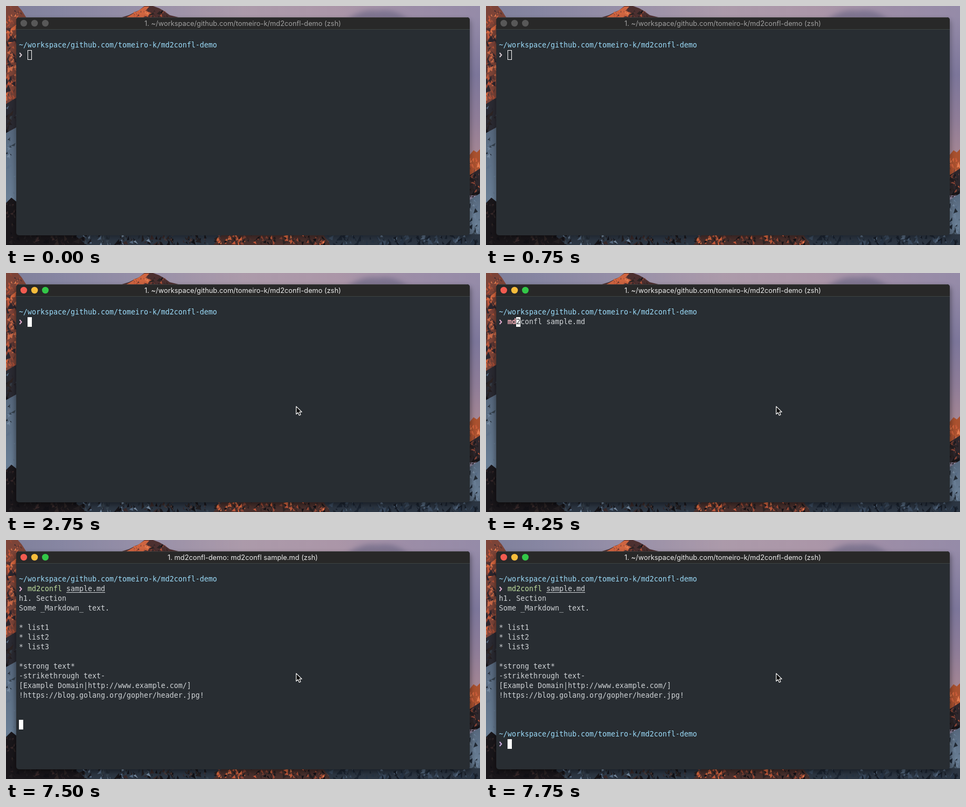
Animation of 880 by 444 pixels, one loop 8 s. Source, as an HTML page:

```html
<!DOCTYPE html>
<html lang="en">
<head>
<meta charset="utf-8">
<title>Terminal demo</title>
<style>
html, body { margin: 0; width: 100%; height: 100%; overflow: hidden; background: #282d32; }
svg { display: block; width: 880px; height: 444px; }
text { white-space: pre; }
#term { font: 13.29px "DejaVu Sans Mono", monospace; }
#title { font: 12.82px Inter, Roboto, sans-serif; text-anchor: middle; }
</style>
</head>
<body>
<svg id="stage" viewBox="0 0 880 444" xmlns="http://www.w3.org/2000/svg">
  <defs>
    <linearGradient id="sky">
      <stop offset="0" stop-color="#7f809b"/>
      <stop offset=".12" stop-color="#8786a2"/>
      <stop offset=".3" stop-color="#9890a8"/>
      <stop offset=".5" stop-color="#ac9aaa"/>
      <stop offset=".7" stop-color="#ab96a8"/>
      <stop offset=".85" stop-color="#9c8da7"/>
      <stop offset="1" stop-color="#958ba8"/>
    </linearGradient>
    <linearGradient id="dusk" x2="0" y2="1">
      <stop offset="0" stop-color="#958ba8"/>
      <stop offset=".4" stop-color="#7c769a"/>
      <stop offset=".7" stop-color="#8f7d98"/>
      <stop offset="1" stop-color="#a98893"/>
    </linearGradient>
    <linearGradient id="snow" x2="0" y2="1">
      <stop offset="0" stop-color="#56677c"/>
      <stop offset=".6" stop-color="#687d94"/>
      <stop offset="1" stop-color="#445263"/>
    </linearGradient>
    <filter id="soft" x="-10%" y="-50%" width="120%" height="200%"><feGaussianBlur stdDeviation="5"/></filter>
  </defs>
  <rect width="880" height="444" fill="url(#sky)"/>
  <path d="M632 26Q660 5 690 9Q722 4 748 26Z" fill="#716a87" opacity=".75" filter="url(#soft)"/>
  <rect x="858" y="20" width="22" height="270" fill="url(#dusk)"/>
  <g id="rocks"></g>
  <rect id="shade" x="17" y="25" width="846" height="406" rx="7" filter="url(#soft)"/>
  <rect x="19" y="21" width="842" height="405" rx="5" fill="#282d32"/>
  <path d="M19 43V26a5 5 0 0 1 5-5H856a5 5 0 0 1 5 5V43Z" fill="#282828"/>
  <path d="M23 21.5H857" stroke="#3c3c3c"/>
  <path d="M19 43.5H861" stroke="#3c4343"/>
  <g id="lights"></g>
  <text id="title" x="439.5" y="37"></text>
  <g id="term"></g>
  <path id="mouse" d="M.8 .8V15.2L4.1 12.2L6.4 17.5L9 16.3L6.8 11.2H11.2Z" fill="#050505" stroke="#fff" stroke-width="1.2" stroke-linejoin="round"/>
</svg>
<script>
const $ = id => document.getElementById(id);
const NS = "http://www.w3.org/2000/svg";

function add(parent, tag, attrs, text) {
  const el = document.createElementNS(NS, tag);
  for (const k in attrs) el.setAttribute(k, attrs[k]);
  if (text) el.textContent = text;
  parent.appendChild(el);
  return el;
}

// Wallpaper: base shapes covered with seeded rock facets
let seed = 11;
const rnd = () => (seed = (seed * 16807) % 2147483647) / 2147483647;
const rocks = $("rocks");
const shape = (d, fill) => add(rocks, "path", { d, fill });

function facets(x, y, w, h, n, size, colors) {
  for (let i = 0; i < n; i++) {
    const px = x + rnd() * w, py = y + rnd() * h, s = size * (0.4 + rnd());
    const fill = colors[Math.floor(rnd() * colors.length)];
    shape(`M${px} ${py}l${s * (rnd() - 0.3)} ${s * 0.8}l${-s * rnd()} ${s * (rnd() - 0.6)}Z`, fill);
  }
}

const lit = ["#d9683f", "#c4583a", "#e27c50", "#8a4536", "#a84d36"];
const warm = ["#b9573a", "#c96a48", "#5a3633", "#352a30", "#2b262e", "#7a4038"];
const dark = ["#171519", "#231f22", "#2c2424", "#121116", "#38292a"];
const cold = ["#566a82", "#6b8098", "#37434f", "#222a34", "#75899f"];
const navy = ["#1b2431", "#263344", "#161c26", "#3a4a5e", "#54677d"];

shape("M0 0H22L29 8L38 22L20 60V190H0Z", "#7c4438");
facets(0, 0, 20, 60, 40, 10, [...lit, "#4c3233"]);
facets(0, 50, 20, 135, 75, 11, warm);
facets(0, 125, 16, 50, 14, 8, lit);
facets(16, 6, 12, 14, 10, 7, warm);
shape("M0 182L20 170V250H0Z", "#2a2a32");
facets(0, 185, 20, 50, 24, 10, [...dark, "#37434f", "#566a82"]);
shape("M0 236L20 225V444H0Z", "url(#snow)");
facets(0, 235, 20, 40, 12, 9, cold);
facets(0, 275, 20, 80, 8, 8, ["#5c7088", "#6f859c"]);
shape("M0 366L10 356L20 364V424H130L160 444H0Z", "#19161a");
facets(0, 364, 19, 72, 26, 10, dark);

shape("M212 22L228 17L240 11L247 8L257 0H273L284 4L293 9L304 17L324 22Z", "#4d3030");
shape("M222 22L245 9L257 1H266L259 9L270 13L253 22Z", "#cf6540");
facets(238, 7, 34, 10, 26, 6, [...lit, "#3a292d"]);
facets(270, 6, 28, 12, 22, 6, [...dark, "#b9573a"]);

shape("M858 280L868 268L874 272L880 266V340H858Z", "#a9512f");
facets(861, 276, 18, 30, 28, 8, lit);
shape("M858 316L880 302V352H858Z", "#2e272c");
facets(861, 308, 18, 45, 32, 9, [...dark, "#b9573a", "#8a4536"]);
shape("M858 362L880 348V444H858Z", "url(#snow)");
facets(861, 355, 18, 80, 26, 9, [...cold, "#1b2431"]);

shape("M125 424H880V444H150Z", "#2c3643");
facets(20, 424, 130, 14, 50, 9, dark);
facets(130, 422, 140, 18, 60, 9, [...cold, ...dark]);
facets(270, 422, 130, 18, 70, 9, [...dark, "#37434f", "#4c3a38"]);
shape("M385 444L400 426H590L602 444Z", "#49302d");
facets(390, 423, 205, 16, 120, 8, [...lit, ...dark]);
facets(595, 422, 280, 18, 140, 10, navy);

// Terminal contents
const COL = 8, ROW = 18, LEFT = 24;
const PLAIN = "#cfd3d6", BLUE = "#9cdcfa", GREEN = "#bfdf9f", ROSE = "#f2adb6";
const PATH = "~/workspace/github.com/tomeiro-k/md2confl-demo";
const SHELL = `1. ${PATH} (zsh)`;
const RUNNING = "1. md2confl-demo: md2confl sample.md (zsh)";
const OUTPUT = ["h1. Section", "Some _Markdown_ text.", "", "* list1", "* list2", "* list3", "",
  "*strong text*", "-strikethrough text-", "[Example Domain|http://www.example.com/]",
  "!https://blog.golang.org/gopher/header.jpg!"];
const term = $("term");

const cellX = col => LEFT + col * COL;
const cellY = row => 64 + row * ROW;

function group() { return add(term, "g", {}); }

function write(g, col, row, text, fill, extra) {
  return add(g, "text", { x: cellX(col), y: cellY(row) + 13, fill, ...extra }, text);
}

function prompt(g, row) {
  write(g, 0, row, PATH, BLUE);
  const y = cellY(row + 1);
  return add(g, "path", { d: `M25.3 ${y + 5}L28.8 ${y + 9}L25.3 ${y + 13}`, fill: "none", "stroke-width": 1.9 });
}

const arrow = prompt(group(), 0);

const block = add(term, "rect", { width: COL, height: ROW });

const recall = group();
write(recall, 2, 1, "md", ROSE, { "font-weight": "bold" });
write(recall, 4, 1, "2", "#282d32");
write(recall, 5, 1, "confl sample.md", PLAIN);

const command = group();
write(command, 2, 1, "md2confl", GREEN);
write(command, 11, 1, "sample.md", PLAIN);
add(command, "path", { d: `M${cellX(11)} 97.5H${cellX(20)}`, stroke: PLAIN });

const output = group();
OUTPUT.forEach((line, i) => line && write(output, 0, i + 2, line, PLAIN));

const again = group();
prompt(again, 16).setAttribute("stroke", "#cfaee2");

const lights = ["#f25b50", "#f6bc3b", "#33c748"].map((color, i) =>
  ({ color, el: add($("lights"), "circle", { cx: 33 + i * 20, cy: 32, r: 6.2 }) }));

// [start, x, y]; no position means hidden
const POINTER = [[0], [250, 568, 275], [500, 567, 302], [750], [2250, 532, 271], [2500, 538, 247]];
// [start, column, row] of the text cursor
const CARET = [[0, 2, 1], [4250, 4, 1], [6000, 20, 1], [7500, 0, 15], [7750, 2, 17]];

const at = (list, t) => list.filter(item => item[0] <= t).pop();
const show = (el, on) => el.setAttribute("visibility", on ? "visible" : "hidden");

function draw(t) {
  const active = t >= 2750;
  lights.forEach(l => l.el.setAttribute("fill", active ? l.color : "#585858"));
  const title = $("title");
  title.textContent = t >= 7500 && t < 7750 ? RUNNING : SHELL;
  title.setAttribute("fill", active ? "#ececec" : "#a0a0a0");
  $("shade").setAttribute("opacity", active ? 0.4 : 0.28);
  arrow.setAttribute("stroke", active ? "#e3aed0" : "#d9ccd4");

  const [, col, row] = at(CARET, t);
  const inset = active ? 0 : 0.5;
  const box = { x: cellX(col) + inset, y: cellY(row) + inset, width: COL - 2 * inset, height: ROW - 2 * inset,
    fill: active ? "#fff" : "none", stroke: active ? "none" : "#fff" };
  for (const k in box) block.setAttribute(k, box[k]);

  show(recall, t >= 4250 && t < 6000);
  show(command, t >= 6000);
  show(output, t >= 7500);
  show(again, t >= 7750);

  const [, x, y] = at(POINTER, t);
  show($("mouse"), x !== undefined);
  if (x !== undefined) $("mouse").setAttribute("transform", `translate(${x} ${y})`);
}

const start = performance.now();
function tick() {
  draw((performance.now() - start) % 8000);
  requestAnimationFrame(tick);
}
draw(0);
requestAnimationFrame(tick);
</script>
</body>
</html>
```
